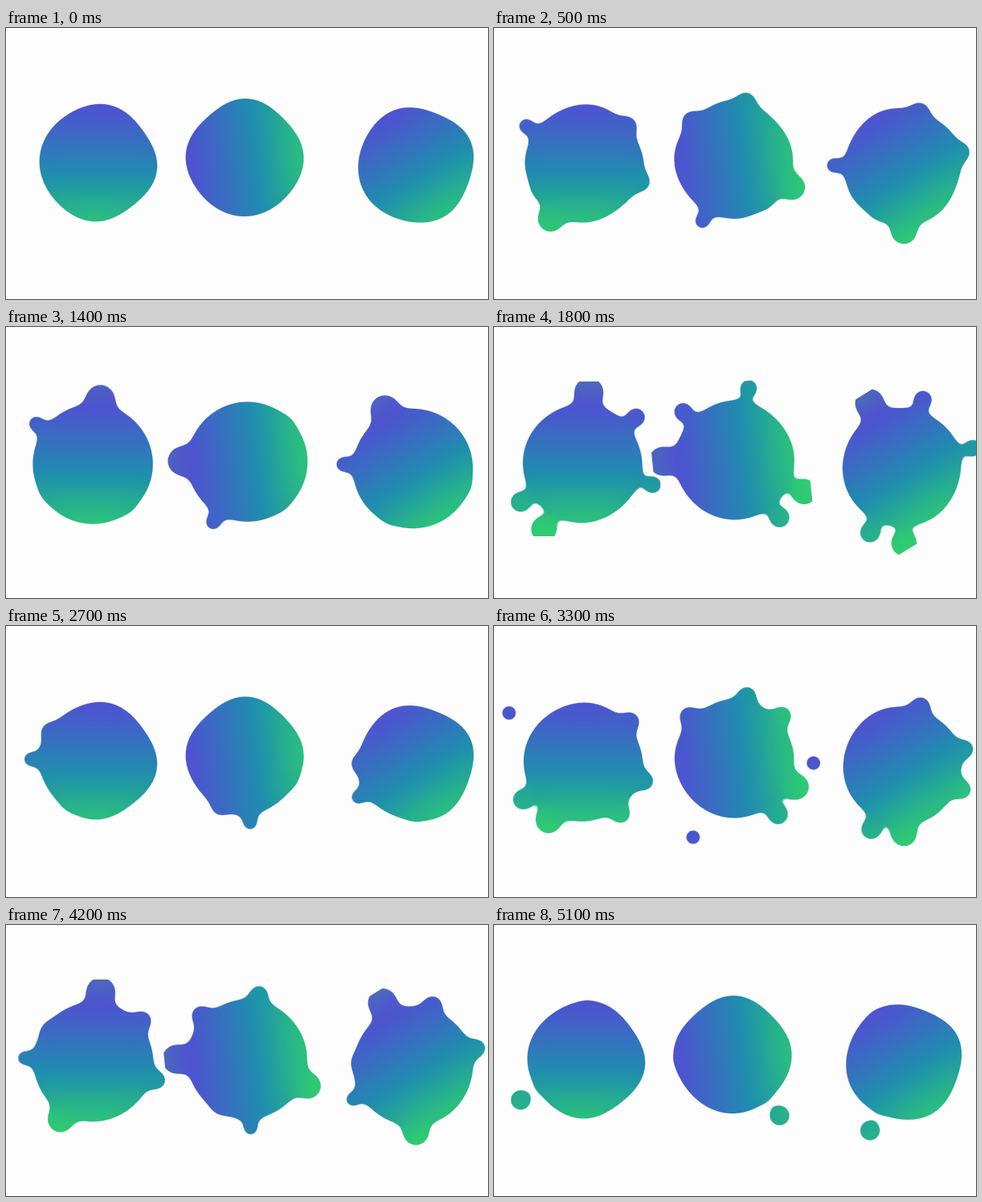
Animation, 600 px wide and 338 px high, one loop 5200 ms. Source, as an HTML page:

```html
<!DOCTYPE html>
<html lang="en">
<head>
<meta charset="utf-8">
<title>Gooey blobs</title>
<style>
  html, body { margin: 0; width: 100%; height: 100%; overflow: hidden; background: #fdfdfd; }
  svg { display: block; width: 600px; height: 338px; }
</style>
</head>
<body>
<svg viewBox="0 0 600 338">
  <defs>
    <linearGradient id="tint" gradientUnits="userSpaceOnUse" x1="0" y1="68" x2="0" y2="250">
      <stop offset="0" stop-color="#4a6cba"/>
      <stop offset=".17" stop-color="#5050d2"/>
      <stop offset=".64" stop-color="#1e8eae"/>
      <stop offset="1" stop-color="#2ecc71"/>
    </linearGradient>
    <filter id="goo" filterUnits="userSpaceOnUse" x="8" y="68" width="199" height="193" color-interpolation-filters="sRGB">
      <feGaussianBlur stdDeviation="8"/>
      <feColorMatrix values="1 0 0 0 0  0 1 0 0 0  0 0 1 0 0  0 0 0 18 -7"/>
    </filter>
    <g id="blob" filter="url(#goo)"><path id="shape" fill="url(#tint)"/></g>
  </defs>
  <use href="#blob"/>
  <use href="#blob" transform="translate(294.5 166.8) rotate(-96) translate(-110 -165)"/>
  <use href="#blob" transform="translate(505 170.5) rotate(-32) translate(-110 -165)"/>
</svg>
<script>
const LOOP = 5200, STEP = 100, MORPH = 2600, RAMP = 600;
const HOME = { x: 112, y: 169 };

// Each drop swings out of the body and back along one direction.
const drops = [
  { angle: 213, reach: 113, r: 10.5, peak: 850, period: 2600 },
  { angle: 274, reach: 88, r: 18, peak: 1780, period: 2600 },
  { angle: 55, reach: 80, r: 12, peak: 900, period: 2400 },
  { angle: 182, reach: 90, r: 10, peak: 800, period: 1670 },
  { angle: 148, reach: 93, r: 13, peak: 1800, period: 1640 },
  { angle: 319, reach: 86, r: 12, peak: 1800, period: 1300 },
  { angle: 18, reach: 90, r: 11.5, peak: 1800, period: 1300 },
  { angle: 121, reach: 97, r: 16, peak: 1800, period: 1300 }
];

const mix = (a, b, k) => a + (b - a) * k;
const radians = deg => deg * Math.PI / 180;
const circle = (x, y, r) => `M${x - r} ${y}a${r} ${r} 0 1 1 ${2 * r} 0a${r} ${r} 0 1 1 ${-2 * r} 0Z`;

// The body swings between a rounded square and a circle.
function body(t) {
  const k = (1 - Math.cos(2 * Math.PI * t / MORPH)) / 2;
  const cx = mix(114, 108, k), cy = mix(168, 171, k);
  const points = [];
  for (let deg = 0; deg < 360; deg += 3) {
    const a = radians(deg), p = a - 0.14;
    const square = 70.5 + (1.9 + 1.1 * Math.cos(p)) * Math.cos(4 * p);
    const r = mix(square, 73.5, k);
    points.push(`${cx + r * Math.cos(a)} ${cy + r * Math.sin(a)}`);
  }
  return `M${points.join('L')}Z`;
}

function drop({ angle, reach, r, peak, period }, t) {
  const swing = Math.abs(Math.cos(Math.PI * (t - peak) / period));
  const d = reach * swing * Math.min(1, t / RAMP);
  return circle(HOME.x + d * Math.cos(radians(angle)), HOME.y + d * Math.sin(radians(angle)), r);
}

const shape = document.getElementById('shape');
const start = performance.now();

function draw(now) {
  const t = Math.floor(Math.max(0, now - start) % LOOP / STEP) * STEP;
  shape.setAttribute('d', body(t) + drops.map(each => drop(each, t)).join(''));
  requestAnimationFrame(draw);
}
draw(start);
</script>
</body>
</html>
```
